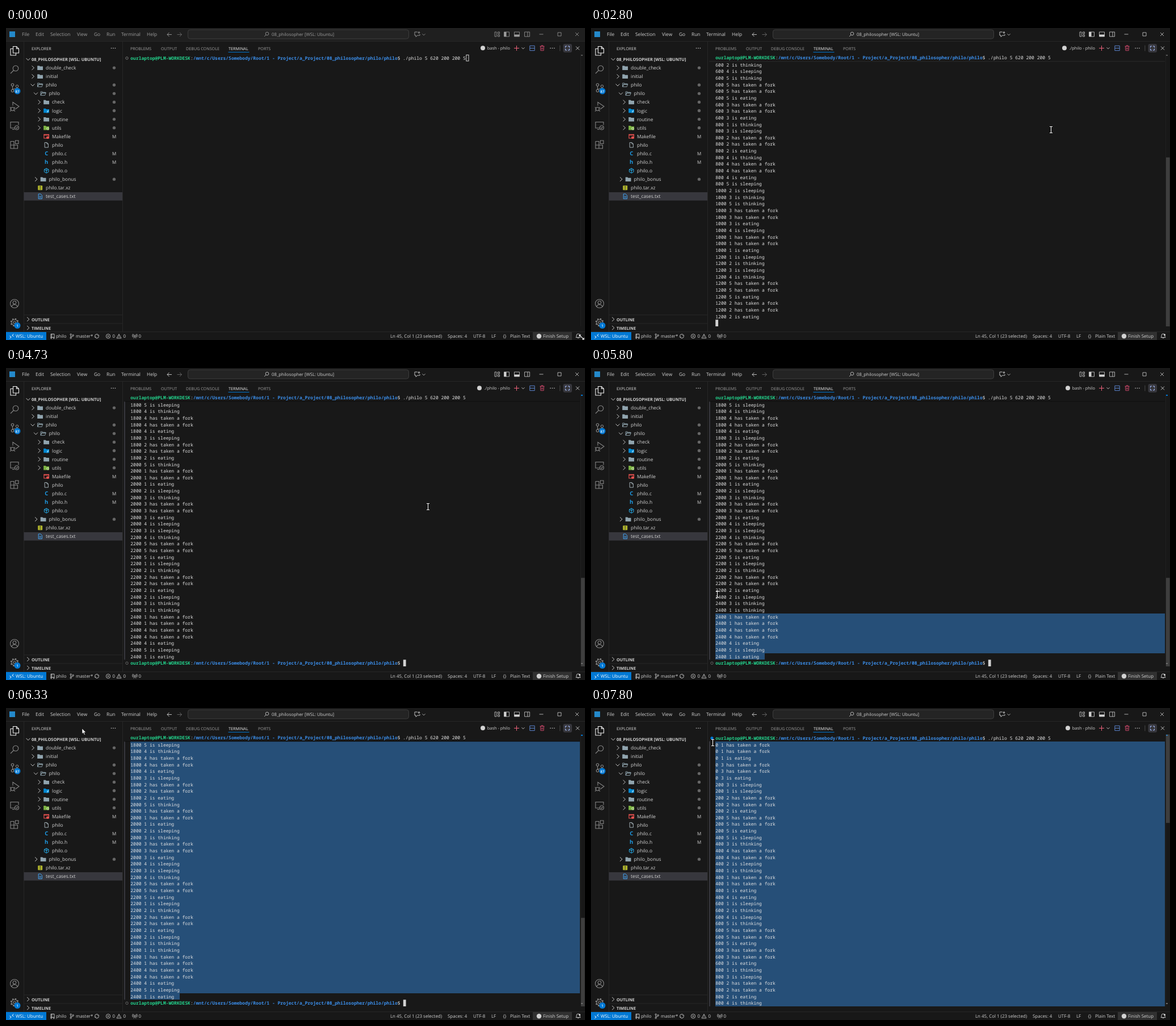
Recreate the animation shown at these times as an HTML page. Size 1020 by 549 pixels, loop 8000 ms.

```html
<!DOCTYPE html>
<html lang="en">
<head>
<meta charset="utf-8">
<title>Terminal session</title>
<style>
html, body { margin: 0; width: 100%; height: 100%; overflow: hidden; background: #181818; }
svg { display: block; width: 1020px; height: 549px; }
text { font-family: "Open Sans", "Noto Sans", sans-serif; text-rendering: geometricPrecision; white-space: pre; }
.mono { font: 500 8.008px "Noto Sans Mono", "DejaVu Sans Mono", monospace; fill: #e2e2e2; }
.user { fill: #23d18b; font-weight: 700; }
.path { fill: #3b8eea; font-weight: 700; }
</style>
</head>
<body>
<svg id="stage" viewBox="0 0 1020 549"></svg>
<script>
const LOOP = 8000, FPS = 15;
const LEFT = 219.3, TOP = 46.9, CW = 4.805, RH = 11.66, ROWS = 41, RIGHT = 1011;
const FG = '#d2d2d2', DIM = '#868686', BLUE = '#0078d4', LINE = '#2b2b2b';

// ---- drawing helpers, all return markup ----
const box = (x, y, w, h, fill, extra = '') =>
  `<rect x="${x}" y="${y}" width="${w}" height="${h}" fill="${fill}" ${extra}/>`;
const dot = (x, y, r, fill, stroke = 'none') =>
  `<circle cx="${x}" cy="${y}" r="${r}" fill="${fill}" stroke="${stroke}"/>`;
const label = (x, cy, s, size = 8.45, fill = FG, extra = '') =>
  `<text x="${x}" y="${cy + 3}" font-size="${size}" fill="${fill}" ${extra}>${s}</text>`;
const icon = (x, y, d, stroke = FG, w = 0.9, fill = 'none') =>
  `<path transform="translate(${x} ${y})" d="${d}" stroke="${stroke}" stroke-width="${w}" fill="${fill}"/>`;
const ring = (x, y, r) => `M${x - r} ${y}a${r} ${r} 0 1 0 ${2 * r} 0a${r} ${r} 0 1 0 ${-2 * r} 0`;
const BOLD = 'font-weight="700"';
const RIGHTWARD = 'M-2-3.6L2 0L-2 3.6', DOWNWARD = 'M-3.4-1.8L0 1.8L3.4-1.8';
const SMALLDOWN = 'M-2.5-1.2L0 1.3L2.5-1.2', CROSS = 'M-3-3L3 3M3-3L-3 3';
const LENS = ring(1, -1, 2.8) + 'M-1 1L-4 4';
const dots = (x, y) => [-3.4, 0, 3.4].map(d => dot(x + d, y, 0.8, FG)).join('');

// ---- program output: philosopher number + action, f = takes both forks ----
const STEPS = ['1f1e3f3e', '3s1s2f2e5f5e', '5s3t4f2s1t1f1e4e', '1s2t4s5t5f5e3f3e',
  '1t3s2f2e4t4f4e5s', '2s3t5t3f3e4s1f1e', '1s2t3s4t5f5e2f2e', '5s3t1t1f1e2s4f4e',
  '2t3f4s1s3e5t5f5e', '1t5s4t4f4e3s2f2e', '5t1f1e2s3t3f3e4s', '3s4t5f5e1s2t2f2e',
  '2s3t1t1f4f4e5s1e'];
const STEP_AT = [22, 25, 28, 32, 35, 38, 42, 45, 48, 51, 55, 58, 61];
const ACTION = { f: 'has taken a fork', e: 'is eating', s: 'is sleeping', t: 'is thinking' };
const log = STEPS.map((step, i) => step.match(/../g).flatMap(([who, act]) => {
  const line = `${i * 200} ${who} ${ACTION[act]}`;
  return act === 'f' ? [line, line] : [line];
}));
const DONE = 61, HOVER = 71, LAST = log.flat().length;

const PROMPT = '<tspan class="user">ourlaptop@PLM-WORKDESK</tspan>:' +
  '<tspan class="path">/mnt/c/Users/Somebody/Root/1 - Project/a_Project/08_philosopher/philo/philo</tspan>$ ';
const COMMAND = PROMPT + './philo 5 620 200 200 5';
const mono = (y, s) => `<text class="mono" x="${LEFT}" y="${y + 9}">${s}</text>`;

// ---- pointer: tick, x, y ----
const PATH = [[2, 1014, 544], [3, 985, 500], [5, 890, 315], [8, 810.5, 179], [70, 810.5, 179],
  [71, 743.5, 244], [74, 560, 420], [78, 307, 508], [80, 307, 508], [84, 240, 486], [86, 220, 437],
  [87, 222.5, 398], [90, 150, 240], [92, 120, 110], [93, 124, 64], [95, 134, 36], [98, 160, 8],
  [101, 180, 4], [104, 180, 4], [110, 200, 30], [116, 214.5, 61]];
function pointer(k) {
  const n = PATH.findIndex(p => p[0] >= k);
  if (n < 0) return PATH[PATH.length - 1].slice(1);
  if (n === 0) return PATH[0].slice(1);
  const [a, ax, ay] = PATH[n - 1], [b, bx, by] = PATH[n], u = (k - a) / (b - a);
  return [ax + (bx - ax) * u, ay + (by - ay) * u];
}
function drawPointer(k) {
  const [x, y] = pointer(k);
  const resize = 'M-4-1v-3h3M-4-4L4 4M1 4h3v-3';
  if (k < 3) return icon(x, y, resize, '#000', 2.6) + icon(x, y, resize, '#fff', 1.2);
  if (x > 208 && y > 46) return icon(x, y, 'M-2.5-5.5h5M0-5.5v11M-2.5 5.5h5', '#fff', 1);
  return icon(x, y, 'M0 0v9.5l2.2-2l1.7 3.8l1.6-.7l-1.7-3.6h3z', '#000', 0.6, '#fff');
}

// ---- terminal ----
function terminal(k) {
  const shown = log.filter((_, i) => k >= STEP_AT[i]).flat();
  const rows = [COMMAND, ...shown];
  const done = k >= DONE, started = k >= STEP_AT[0], hovered = k >= HOVER;
  if (done) rows.push(PROMPT); else if (started) rows.push('');
  const total = rows.length, end = Math.max(0, total - ROWS);
  const top = k > 95 ? Math.max(0, end - 15 * (k - 95)) : end;
  const sticky = top > 0 && k > 35;
  const rowY = r => TOP + (r - top) * RH;
  const visible = r => r >= top && r < top + ROWS;
  let out = '';

  if (k > 80) { // drag selection trails the pointer by one tick
    const [mx, my] = pointer(k - 1);
    const row = Math.max(0, Math.min(ROWS - 1, Math.floor((my - TOP) / RH)));
    const first = Math.min(LAST, top + row);
    const col = Math.max(0, Math.min(18, Math.round((mx - LEFT) / CW)));
    for (let r = first; r <= LAST; r++) if (visible(r)) {
      const x = LEFT + (r === first ? col * CW : 0);
      const x2 = r === LAST ? LEFT + 18 * CW : RIGHT;
      out += box(x, rowY(r), Math.max(0, x2 - x), RH + 0.05, '#264f78', 'shape-rendering="crispEdges"');
    }
  }
  rows.forEach((s, r) => { if (visible(r)) out += mono(rowY(r), s); });

  if (top === 0) out += dot(213, 53, 2.2, done ? BLUE : 'none', done ? BLUE : '#777');
  if (done && visible(LAST + 1)) out += dot(213, rowY(LAST + 1) + 6, 2.2, 'none', '#666');

  const cr = started ? total - 1 : 0, cx = LEFT + CW * (done ? 100 : started ? 0 : 123);
  if (visible(cr)) out += k < 10
    ? box(cx + 0.5, rowY(cr) + 0.5, CW - 0.6, RH - 1, 'none', `stroke="${FG}"`)
    : box(cx, rowY(cr), CW, RH, FG);

  if (hovered) {
    const from = Math.max(rowY(1), TOP + RH), to = Math.min(rowY(LAST + 1), 525);
    out += box(208, from, 2, to - from, '#37373d');
  }
  if (sticky) out += box(210, 46, RIGHT - 210, 13, '#181818') +
    box(208, 58.4, RIGHT - 208, 0.8, hovered ? '#0c0c0c' : '#303030') + mono(TOP - 1.3, COMMAND);

  out += box(1012, 46, 0.7, 479, '#242424');
  out += box(1013, 47, 3, 2, done ? BLUE : '#555');
  if (done) out += box(1013, 519, 3, 2, '#666');
  if (total > ROWS) out += box(1013, 46.5 + 478.5 * top / total, 6.5, 478.5 * ROWS / total, '#797979',
    `opacity="${0.4 * Math.min(1, (k - 34) / 3)}"`);

  const running = k >= 23 && k < 74;
  out += dot(running ? 834 : 840, 35.3, 4, FG) +
    label(888, 35.3, running ? './philo - philo' : 'bash - philo', 7.4, FG, 'text-anchor="end"');
  return out;
}

// ---- window frame ----
function titleBar(focused) {
  const fg = focused ? FG : '#9d9d9d';
  let out = box(0, 0, 1020, 23.5, focused ? '#181818' : '#1f1f1f') + box(0, 23, 1020, 0.8, LINE);
  out += box(6, 6, 10, 10, '#2489ca');
  [[28, 'File'], [52, 'Edit'], [78, 'Selection'], [125, 'View'], [155, 'Go'], [177, 'Run'],
    [203, 'Terminal'], [248, 'Help']].forEach(([x, s]) => out += label(x, 11, s, 8.4, fg));
  out += icon(288, 11.5, 'M4 0H-4M-.5-3.5L-4 0L-.5 3.5', fg) +
    icon(305.5, 11.5, 'M-4 0H4M.5-3.5L4 0L.5 3.5', '#6a6a6a');
  out += box(320.5, 3, 389, 16, '#242424', 'rx="4" stroke="#454545" stroke-width=".8"');
  out += icon(459, 11, LENS, fg, 0.8) + label(468, 11, '08_philosopher [WSL: Ubuntu]', 7.78, fg);
  out += icon(724, 11, 'M1-4h-5v6h2v2.5l3-2.5h4v-2M3.5-5v4M1.5-3h4', fg) + icon(736, 11.5, SMALLDOWN, fg, 0.8);
  out += icon(865, 11, 'M-4-4h3v8h-3zM1.5-4h3v3h-3zM1.5 1h3v3h-3z', fg, 0.8);
  const pane = 'M-4.5-4h9v8h-9z';
  out += icon(882, 11, pane, fg, 0.8) + box(877.5, 7, 4, 8, fg);
  out += icon(900, 11, pane, fg, 0.8) + box(895.5, 11.5, 9, 3.5, fg);
  out += icon(918, 11, pane + 'M1-4v8', fg, 0.8);
  return out + icon(943, 11, 'M-3.5 0h7', fg, 0.8) + icon(975, 11, 'M-3-3h6v6h-6z', fg, 0.8) +
    icon(1006, 11, CROSS, fg, 0.8);
}

function activityBar() {
  const g = (y, d, c = DIM) => icon(15, y, d, c, 1.1);
  const badge = (y, s) => dot(20, y, 5.5, BLUE) +
    label(20, y - 0.5, s, 6, '#fff', 'text-anchor="middle" font-weight="600"');
  return box(31, 23.5, 0.8, 511, LINE) +
    g(40, 'M-2.5-7.5h6l4 4v7.5h-10zM3.5-7.5v4h4M-2.5-3.5h-4.5v11.5h9.5v-4', '#eee') +
    g(73, ring(2, -2, 4.8) + 'M-1.5 1.5L-7 7') +
    g(105, ring(-3.5, -5, 2.2) + ring(-3.5, 5.5, 2.2) + ring(4.5, -2.5, 2.2) + 'M-3.5-3v6.3M4.5 0c0 3-8 1-8 3.3') +
    badge(111, '87') +
    g(138.5, 'M-3-2v-6l11 7.5l-7 5' + ring(-3.5, 4, 3) + 'M-8 1l2 1.5M-8 4.5h2M-8 8l2-1.5M1 1l-2 1.5M1 8l-2-1.5') +
    g(171.5, 'M0 4.5h-7v-10.5h14v5M-4 7h4' + ring(4, 4, 3.5) + 'M2.5 4l1.2 1.2L5.8 3') +
    g(205, 'M-7-5.5h6v12.5M-7-5.5v12.5h12.5v-6h-12.5M1.5-7h5.5v5.5h-5.5z') +
    g(485, ring(0, 0, 7.5) + ring(0, -2, 2.8) + 'M-5 5.5c1-5 9-5 10 0') +
    g(518, ring(0, 0, 2) + ring(0, 0, 5)) +
    `<circle cx="15" cy="518" r="6.3" fill="none" stroke="${DIM}" stroke-width="2" stroke-dasharray="2.5 2.45"/>` +
    badge(523.5, '1');
}

// depth, name, kind, git mark
const TREE = [[0, 'double_check', 'dir', 'o'], [0, 'initial', 'dir', ''], [0, 'philo', 'open', 'o'],
  [1, 'philo', 'open', 'o'], [2, 'check', 'dir', 'o'], [2, 'logic', 'blue', 'o'], [2, 'routine', 'dir', 'o'],
  [2, 'utils', 'green', 'o'], [2, 'Makefile', 'make', 'M'], [2, 'philo', 'file', ''], [2, 'philo.c', 'C', 'M'],
  [2, 'philo.h', 'h', 'M'], [2, 'philo.o', 'cube', ''], [1, 'philo_bonus', 'dir', 'o'],
  [0, 'philo.tar.xz', 'zip', ''], [0, 'test_cases.txt', 'text', '']];
const FOLDER = 'M-5-3.7h3.6l1.2 1.2h5v6.3h-9.8z', PAGE = 'M-3-4.3h3.8l2.4 2.4v6.2h-6.2z';
function fileIcon(kind, x, y) {
  const folder = c => icon(x, y, FOLDER, 'none', 0, c);
  switch (kind) {
    case 'dir': return folder('#90a4ae');
    case 'open': return icon(x, y, 'M-4.6 3v-6.3h3.2l1.2 1.2h4v1.5h-6.2zl1.8-4.6h7.5l-1.8 4.8h-7.5', '#90a4ae', 0.9);
    case 'blue': return folder('#0288d1') + icon(x + 2, y + 1, 'M-1 3c1 0 1-5 3-5M-1 0h3', '#b3e5fc');
    case 'green': return folder('#7cb342') + dot(x + 2.5, y + 1.5, 1.8, 'none', '#dcedc8');
    case 'make': return icon(x, y, 'M-4.3-3.5h8.6v6.8h-8.6zM-4.3-2.2h8.6', '#ef5350', 1.1) + dot(x + 2, y + 2, 2.2, '#ef5350');
    case 'file': return icon(x, y, PAGE + 'M.8-4.3v2.4h2.4', '#b0bec5', 0.9);
    case 'cube': return icon(x, y, 'M0-4.2L3.8-2.1v4.2L0 4.2l-3.8-2.1v-4.2zL0 0l3.8-2.1M0 0v4.2M-3.8-2.1L0 0', '#29b6f6', 0.9);
    case 'zip': return box(x - 4, y - 4, 8, 8, '#afb42b', 'rx="1"') + icon(x, y, 'M0-3v3M0 1v2', '#333', 1.2);
    case 'text': return icon(x, y, PAGE + 'M-1.5 0h3M-1.5 2h3', '#42a5f5', 1);
    default: return label(x, y, kind, 9.5, '#1e9be5', BOLD + ' text-anchor="middle"');
  }
}
function sideBar() {
  let out = box(205, 23.5, 0.8, 511, LINE) + label(45, 35.5, 'EXPLORER', 7.25) + dots(189, 35.5);
  out += icon(39, 55, DOWNWARD) + label(45, 55, '08_PHILOSOPHER [WSL: UBUNTU]', 7.45, FG, BOLD);
  out += box(31.5, 289, 173.5, 14.6, '#37373d');
  TREE.forEach(([depth, name, kind, git], i) => {
    const y = 70.1 + i * 15.08, x = depth * 5.5;
    if (/dir|blue|green/.test(kind)) out += icon(47.5 + x, y, RIGHTWARD);
    if (kind === 'open') out += icon(47 + x, y, DOWNWARD);
    out += fileIcon(kind, 60.2 + x, y) + label(70 + x, y, name, 8.42);
    if (git === 'o') out += dot(190.5, y, 2.7, '#666');
    if (git === 'M') out += label(190.5, y, 'M', 8, FG, 'text-anchor="middle"');
  });
  [['OUTLINE', 512.5], ['TIMELINE', 527.6]].forEach(([s, y]) =>
    out += box(32, y - 8, 173, 0.8, LINE) + icon(39, y, RIGHTWARD) + label(45, y, s, 7.25, FG, BOLD));
  return out;
}

function panelBar() {
  let out = '';
  [[219, 'PROBLEMS'], [273, 'OUTPUT'], [317, 'DEBUG CONSOLE'], [392, 'TERMINAL'], [444, 'PORTS']]
    .forEach(([x, s]) => out += label(x, 35.5, s, 7.2, s === 'TERMINAL' ? '#eee' : '#9d9d9d'));
  out += box(391.5, 42, 37, 1, BLUE);
  out += icon(899.5, 35.5, 'M-4.5 0h9M0-4.5v9', '#f0627c', 1) + icon(911, 35.5, SMALLDOWN);
  out += icon(927, 35.5, 'M-4.2-4.2h8.4v8.4h-8.4zM-4.2 0h8.4', '#6c9ef8', 0.8);
  out += icon(944.5, 35.5, 'M-4-3.3h8M-1.3-3.3v-1.4h2.6v1.4M-3-3.3l.4 7.5h5.2l.4-7.5M-1-1v3.2M1-1v3.2', '#f0527c', 0.8);
  out += dots(962.5, 35.5) + box(981.5, 28, 15.5, 15, '#37373d', 'rx="3"') + box(975.5, 30.5, 0.8, 10, '#555');
  out += icon(989, 35.5, 'M-3.5-1v-2.5h2.5M1-3.5h2.5v2.5M3.5 1v2.5h-2.5M-1 3.5h-2.5v-2.5', '#a9c1ff', 1);
  return out + icon(1007, 35.5, CROSS);
}

function statusBar() {
  const y = 542.3;
  let out = box(0, 534.5, 1020, 14.5, '#181818') + box(0, 534.3, 1020, 0.8, LINE);
  out += box(0, 535, 71, 14, BLUE) + icon(10, y, 'M-3.5-.5L-.8 1.5L-3.5 3.8M3.5-3.8L.8-1.5L3.5.5', '#fff', 1);
  out += box(928, 535, 69, 14, '#313131') + dot(939, y, 4.2, FG);
  [[17, 'WSL: Ubuntu'], [88, 'philo'], [123, 'master*'], [187.5, '0'], [206.5, '0'], [233.5, '0'],
    [677, 'Ln 45, Col 1 (23 selected)'], [778, 'Spaces: 4'], [823, 'UTF-8'], [855, 'LF'], [875.5, '{}'],
    [888, 'Plain Text'], [946, 'Finish Setup']].forEach(([x, s]) => out += label(x, y, s, 7.95, x < 20 ? '#fff' : FG));
  out += icon(82, y, 'M-3-3.8h6v6h-6zM-3 2v2h2M1 4h2v-2M-1.3-3.8v6');
  out += icon(116, y, ring(-1.8, -3, 1.2) + ring(-1.8, 3, 1.2) + ring(2.2, -1.5, 1.2) + 'M-1.8-1.8v3.6M2.2-.3c0 1.5-4 .5-4 2', FG, 0.8);
  out += icon(160, y, 'M-3.5 0a3.5 3.5 0 0 1 6.5-1.8M3.5 0a3.5 3.5 0 0 1-6.5 1.8M1.3-1.3h3M-4.3 1.3h3');
  out += icon(180, y, ring(0, 0, 3.7) + 'M-1.5-1.5l3 3M1.5-1.5l-3 3', FG, 0.8);
  out += icon(199, y, 'M0-3.7L4 3.5h-8zM0-1v2M0 2v.8', FG, 0.8);
  out += icon(227, y, ring(0, -1, 0.9) + 'M0 0l-2 4M0 0l2 4M-2-3.5q-1.6 2.5 0 5M2-3.5q1.6 2.5 0 5M-3.5-4q-2 3 0 6M3.5-4q2 3 0 6', FG, 0.7);
  return out + icon(1008, y, 'M-4 2.3h8l-1-1.5v-2a3 3 0 0 0-6 0v2zM-1 2.5a1 1 0 0 0 2 0') + dot(1010.5, y - 2.5, 1.6, FG);
}

const chrome = activityBar() + sideBar() + panelBar() + statusBar();

function hoverRow(k) {
  const [x, y] = pointer(k), i = Math.floor((y - 62.5) / 15.08);
  return x > 32 && x < 205 && i >= 0 && i < TREE.length - 1 ? box(32, 62.5 + i * 15.08, 173, 15.08, '#2a2d2e') : '';
}

const stage = document.getElementById('stage');
let last = -1;
function frame(now) {
  const k = Math.floor((now % LOOP) * FPS / 1000 + 0.06);
  if (k !== last) {
    last = k;
    stage.innerHTML = box(0, 0, 1020, 549, '#181818') + hoverRow(k) + terminal(k) + chrome +
      titleBar(k >= 10) + drawPointer(k);
  }
  requestAnimationFrame(frame);
}
frame(0);
</script>
</body>
</html>
```
